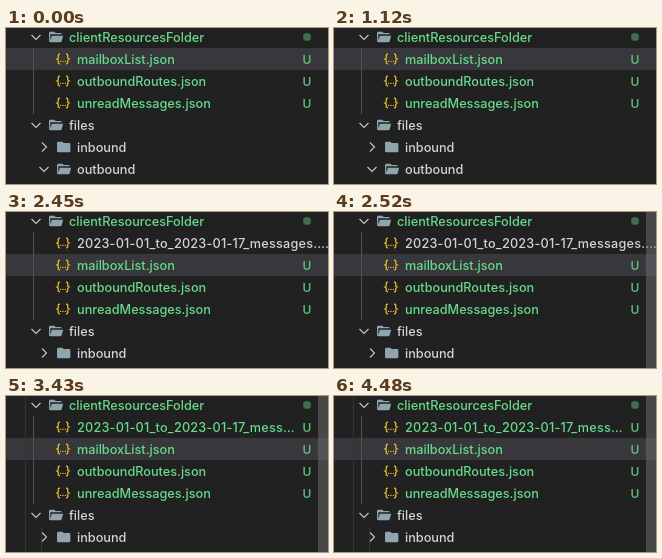
These frames come from a looping animation (322 px wide and 156 px high, 4.62 s). An HTML page:

```html
<!DOCTYPE html>
<html lang="en">
<head>
<meta charset="utf-8">
<style>
  html, body { margin: 0; width: 100%; height: 100%; overflow: hidden; background: #212122; }
  svg { display: block; font: 500 12.7px Inter, sans-serif; }
  .label { fill: #d2d3d4; }
  .new { fill: #66da8a; }
  .badge { fill: #66da8a; opacity: .8; font-size: 12px; font-weight: 600; text-anchor: middle; }
  .dot { fill: #66da8a; opacity: .42; }
  .dated { letter-spacing: .2px; }
  .chevron { fill: none; stroke: #c5c6c7; stroke-width: 1.1; }
  .folder { fill: #90a4ae; }
  .braces { fill: none; stroke: #f6c52e; stroke-width: 2; }
  .dots { fill: #f6c52e; }
  .scrollbar { fill: #797979; opacity: .45; }
</style>
</head>
<body>
<svg id="stage" width="322" height="156" viewBox="0 0 322 156"></svg>
<script>
const LOOP = 4620;
// File added, scrollbar revealed, file tracked with the tree hovered.
const STEPS = [2450, 2520, 3360];
const ROW = 22, FIRST = 9;
const stage = document.getElementById('stage');

const closedFolder = 'M10 4H4a2 2 0 0 0-2 2v12a2 2 0 0 0 2 2h16a2 2 0 0 0 2-2V8a2 2 0 0 0-2-2h-8z';
const openFolder = 'M19 20H4a2 2 0 0 1-2-2V6a2 2 0 0 1 2-2h6l2 2h7a2 2 0 0 1 2 2H4v10l2.14-8h17.07l-2.28 8.5A2 2 0 0 1 19 20z';
const brace = 'M7 4H6a2 2 0 0 0-2 2v4a2 2 0 0 1-2 2H0h2a2 2 0 0 1 2 2v4a2 2 0 0 0 2 2h1';

// Icons use a 24-unit box centred on (x, y).
const icon = (x, y, scale, content) =>
  `<g transform="translate(${x} ${y}) scale(${scale}) translate(-12 -12)">${content}</g>`;

const text = (x, y, cls, value) => `<text x="${x}" y="${y + 4.6}" class="${cls}">${value}</text>`;

const guide = (x, y, height, color) =>
  `<rect x="${x}" y="${y}" width="1" height="${height}" fill="${color}"/>`;

const folder = (name, { depth = 0, open = true, isNew = false } = {}) => y => {
  const dx = depth * 8;
  const x = 30 + dx;
  const chevron = open ? `M${x - 4.5} ${y - 2}l4.5 4.5 4.5-4.5` : `M${x - 2} ${y - 4.5}l4.5 4.5-4.5 4.5`;
  return `<path class="chevron" d="${chevron}"/>`
    + icon(49.7 + dx, y, 2 / 3, `<path class="folder" d="${open ? openFolder : closedFolder}"/>`)
    + text(63 + dx, y, isNew ? 'new' : 'label', name)
    + (isNew ? `<circle class="dot" cx="301" cy="${y}" r="4"/>` : '');
};

const file = (name, { isNew = true, selected = false, cls = '' } = {}) => y => {
  const braces = `<path class="braces" d="${brace}"/>`
    + `<path class="braces" d="${brace}" transform="matrix(-1 0 0 1 24 0)"/>`
    + [8, 12, 16].map(x => `<circle class="dots" cx="${x}" cy="16" r="1.1"/>`).join('');
  return (selected ? `<rect y="${y - 11}" width="322" height="${ROW}" fill="#37373c"/>` : '')
    + icon(57, y, .6, braces)
    + text(71, y, `${isNew ? 'new' : 'label'} ${cls}`, name)
    + (isNew ? text(301, y, 'badge', 'U') : '');
};

function draw(phase) {
  const added = phase >= 1, scrollbar = phase >= 2, tracked = phase >= 3;
  const datedName = '2023-01-01_to_2023-01-17_mess' + (tracked ? '…' : 'ages.…');
  const files = [
    file('mailboxList.json', { selected: true }),
    file('outboundRoutes.json'),
    file('unreadMessages.json')
  ];
  if (added) files.unshift(file(datedName, { isNew: tracked, cls: 'dated' }));
  const rows = [
    folder('clientResourcesFolder', { isNew: true }),
    ...files,
    folder('files'),
    folder('inbound', { depth: 1, open: false }),
    folder('outbound', { depth: 1 })
  ];
  stage.innerHTML = rows.map((row, i) => row(FIRST + i * ROW)).join('')
    + guide(27, 20, files.length * ROW, '#515254')
    + (tracked ? guide(19, 0, 156, '#333') + guide(35, 130, 26, '#333') : '')
    + (scrollbar ? '<rect class="scrollbar" x="312" width="10" height="156"/>' : '');
}

let shown = -1;
function tick() {
  const time = performance.now() % LOOP;
  const phase = STEPS.filter(step => time >= step).length;
  if (phase !== shown) draw(shown = phase);
  requestAnimationFrame(tick);
}
tick();
</script>
</body>
</html>
```
